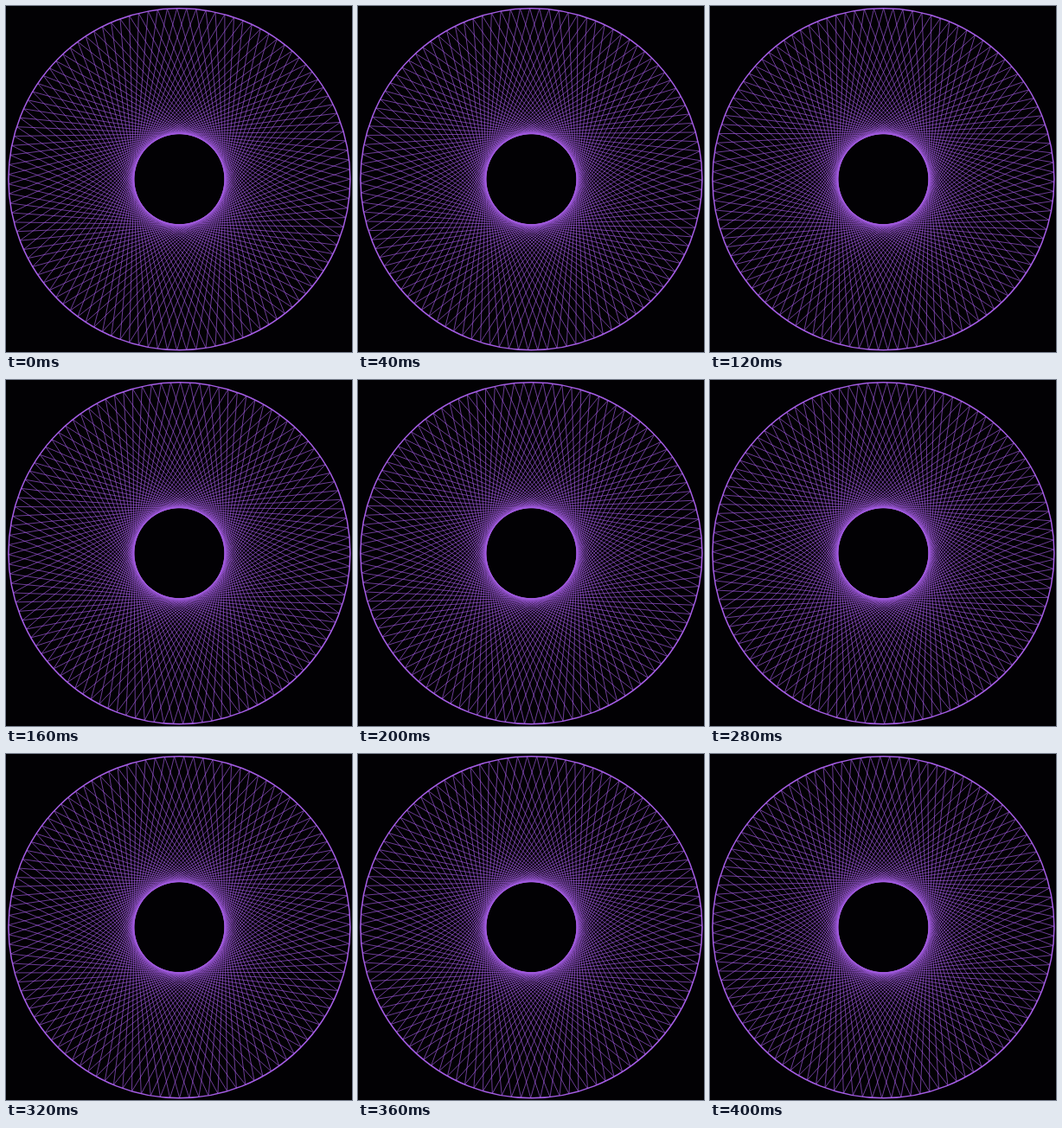
Animation, 400 px wide and 400 px high, one loop 0.44 s. Source, as an HTML page:

```html
<!DOCTYPE html>
<html>
<head>
<meta charset="utf-8">
<style>
html, body { margin: 0; height: 100%; overflow: hidden; background: #020104; }
svg { display: block; width: 400px; height: 400px; }
path, circle { fill: none; stroke: #a45ce4; }
path { stroke-width: .65; }
circle { stroke-width: 1.5; }
</style>
</head>
<body>
<svg viewBox="0 0 400 400">
  <path id="web"/>
  <circle cx="200.4" cy="200.2" r="197.5"/>
</svg>
<script>
const COUNT = 111, SKIP = 46, RADIUS = 197.5;
const STEPS = 11, STEP_MS = 40;
const web = document.getElementById('web');
let shown = -1;

function point(i) {
  const a = i * 2 * Math.PI / COUNT;
  return (200.4 + RADIUS * Math.cos(a)).toFixed(2) + ' ' + (200.2 + RADIUS * Math.sin(a)).toFixed(2);
}

// The web turns by one chord spacing per loop.
function draw(step) {
  const turn = step / STEPS;
  let d = '';
  for (let i = 0; i < COUNT; i++) d += `M${point(i + turn)}L${point(i + SKIP + turn)}`;
  web.setAttribute('d', d);
}

function tick() {
  const step = Math.floor(performance.now() / STEP_MS) % STEPS;
  if (step !== shown) draw(shown = step);
  requestAnimationFrame(tick);
}
tick();
</script>
</body>
</html>
```
